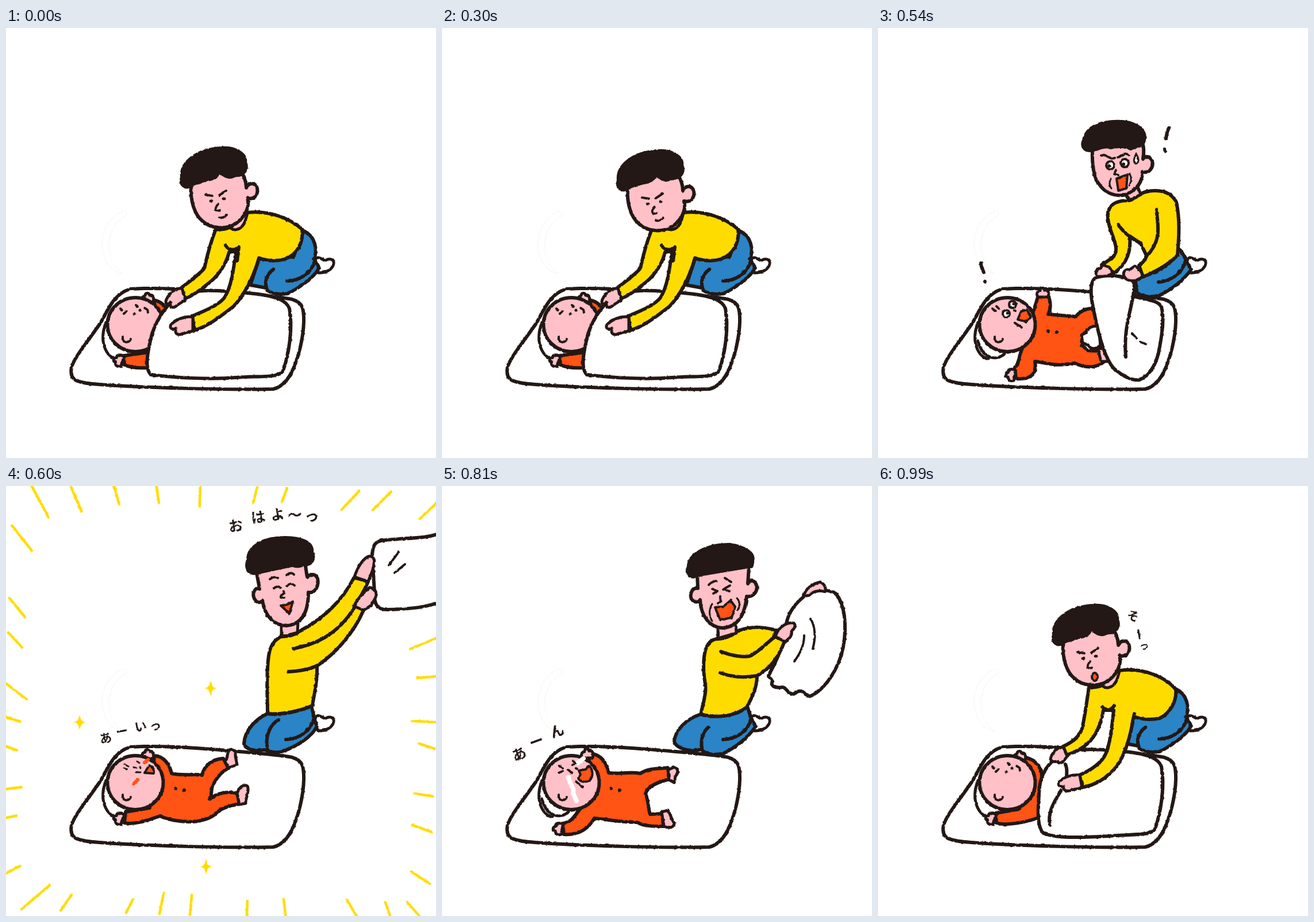
Recreate the animation shown at these times as an HTML page. Size 748 by 748 pixels, loop 1020 ms.

```html
<!DOCTYPE html>
<html lang="ja">
<head>
<meta charset="utf-8">
<title>Morning blanket</title>
<style>
html, body { margin: 0; width: 100%; height: 100%; overflow: hidden; background: #fff; }
svg { display: block; width: 100vw; height: 100vh; }
path, circle, ellipse { stroke: #231815; stroke-width: 6; stroke-linecap: round; stroke-linejoin: round; fill: none; }
.thin { stroke-width: 4; }
.fine { stroke-width: 3; }
.dot { fill: #231815; stroke: none; }
.white { fill: #fff; }
.skin { fill: #ffc0c8; }
.yellow { fill: #ffdc00; }
.blue { fill: #2a84c6; }
.orange { fill: #ff5414; }
.hair { fill: #231815; stroke-width: 4; }
.hand { stroke-width: 5; }
.ray { stroke: #ffdc00; stroke-width: 4.5; }
.star { stroke: none; fill: #ffdc00; }
.blush { stroke: #ff5414; stroke-width: 6; }
.tear { stroke: #fff; stroke-width: 8; }
.ghost { stroke: #f1f1f1; stroke-width: 1; stroke-dasharray: 3 2; }
text { font: 700 25px "Noto Sans CJK JP", "Noto Sans CJK", sans-serif; fill: #231815; text-anchor: middle; }
.small { font-size: 21px; }

.scene { visibility: hidden; animation: 1020ms step-end infinite; }
#cover { animation-name: cover; }
#sneak { animation-name: sneak; }
#shock { animation-name: shock; }
#happy { animation-name: happy; }
#cry { animation-name: cry; }
@keyframes cover { 0% { visibility: visible } 41.17%, 100% { visibility: hidden } }
@keyframes sneak { 0%, 50%, 100% { visibility: hidden } 41.17%, 97.05% { visibility: visible } }
@keyframes shock { 0%, 58.82%, 97.05%, 100% { visibility: hidden } 50%, 88.23% { visibility: visible } }
@keyframes happy { 0%, 73.52%, 100% { visibility: hidden } 58.82% { visibility: visible } }
@keyframes cry { 0%, 88.23%, 100% { visibility: hidden } 73.52% { visibility: visible } }

.nod { animation: nod 1020ms step-end infinite; }
@keyframes nod {
  0%, 11.76%, 23.52%, 35.29% { transform: none }
  5.88%, 17.64%, 29.41%, 41.17% { transform: translate(1px, 5px) }
}
.pop { transform-box: fill-box; transform-origin: 50% 100%; animation: pop 1020ms step-end infinite; }
@keyframes pop {
  0%, 50%, 91.17% { transform: none }
  55.88%, 88.23%, 94.11% { transform: scale(1.25) }
}
.shake { animation: shake 60ms step-end infinite; }
@keyframes shake { 0% { transform: translate(0, 3px) } 49.9% { transform: none } }
.flare { transform-origin: 374px 374px; animation: flare 60ms step-end infinite; }
@keyframes flare { 0% { transform: rotate(2deg) } 49.9% { transform: none } }
.twinkle { transform-box: fill-box; transform-origin: center; animation: twinkle 60ms step-end infinite; }
@keyframes twinkle { 0% { transform: scale(.8) } 49.9% { transform: none } }
</style>
</head>
<body>
<svg viewBox="0 0 748 748">
<defs>
  <filter id="crayon" filterUnits="userSpaceOnUse" x="0" y="0" width="748" height="748" color-interpolation-filters="sRGB">
    <feTurbulence type="fractalNoise" baseFrequency=".2" numOctaves="1" seed="4"/>
    <feDisplacementMap in="SourceGraphic" scale="3" xChannelSelector="R" yChannelSelector="G"/>
  </filter>
  <path id="fist" class="skin hand" d="M-9 7C-12 1-10-3-5-4C-5-10 1-10 3-5C9-7 11 0 9 7Z"/>
  <g id="babyHead">
    <ellipse class="skin" cx="225" cy="516" rx="48.5" ry="47"/>
    <path class="thin" d="M203 537C202 549 214 549 217 541"/>
  </g>
  <g id="sleepFace">
    <path class="thin" d="M199 488L202 491M205 497L209 493M226 482L229 485M241 487L246 490L247 495"/>
    <circle class="dot" cx="223" cy="497" r="2.5"/><circle class="dot" cx="233" cy="491" r="2.5"/>
  </g>
  <g id="sideHead">
    <path class="skin" d="M322 274C320 300 328 325 342 336C358 351 385 350 400 340C414 330 425 312 420 296C435 300 440 285 436 276C430 266 420 272 418 278C418 265 412 255 412 255L380 240L325 265Z"/>
    <path class="hair" d="M324 274C310 283 301 272 305 260C302 235 330 210 375 208C400 206 420 220 417 233C423 248 412 258 400 257C390 263 382 260 372 252C365 262 355 265 346 265C338 272 330 268 324 274Z"/>
    <path class="thin" d="M347 290L359 292M371 291L383 283M369 306C362 315 364 320 372 317"/>
    <ellipse class="dot" cx="357" cy="301" rx="3.5" ry="2.5"/><ellipse class="dot" cx="379" cy="297" rx="3.5" ry="2.5"/>
  </g>
  <g id="crouch">
    <path class="blue" d="M518 353C538 362 542 385 536 402L545 417C535 435 510 452 490 462C470 465 455 460 452 452L425 447L440 402L500 398Z"/>
    <path d="M465 420C451 430 449 445 455 456M489 440C512 440 532 425 537 405"/>
  </g>
  <path id="neck" class="skin hand" d="M386 335L392 349C400 354 411 349 416 336L420 322Z"/>
  <path id="pillowEnd" class="hand" d="M174 545C182 575 205 580 220 567"/>
  <path id="lap" d="M474 407C458 415 449 440 456 460M487 441C512 440 530 425 536 404"/>
  <path id="spark" class="star" d="M0-17C3-4 4-3 13 0C4 3 3 4 0 17C-3 4-4 3-13 0C-4-3-3-4 0-17Z"/>
</defs>

<g filter="url(#crayon)">
  <path class="ghost" d="M203 319C175 330 166 360 167 380C170 405 182 425 203 427C187 417 178 395 179 375C181 350 193 334 208 327C212 321 207 317 203 319Z"/>
  <path class="white" d="M216 454C190 462 180 484 165 512C145 542 119 572 114 590C110 611 120 616 150 619C230 626 400 630 465 628C490 622 503 592 512 555C520 520 519 495 515 485C508 470 490 470 450 466C380 459 290 452 240 453Z"/>
  <path class="hand" d="M174 512C161 545 174 572 192 576"/>
  <path class="white hand" d="M535 408L541 400C547 397 550 405 556 404C563 400 571 402 570 410C568 420 557 426 543 426Z"/>

  <g id="cover" class="scene">
    <path class="orange" d="M256 473C269 475 280 484 281 496L268 508Z"/>
    <path class="orange" d="M205 570L248 564L246 591C230 592 215 590 206 586Z"/>
    <use href="#fist" x="247" y="470"/>
    <use href="#fist" transform="translate(196 578) rotate(-70)"/>
    <use href="#babyHead"/><use href="#sleepFace"/>
    <path class="white" d="M252 603C240 592 247 560 254 532C262 508 277 484 300 466C330 453 370 456 430 462C470 466 488 474 493 488C499 520 493 565 482 596C475 609 445 605 400 608C350 612 290 608 252 603Z"/>
    <use href="#crouch"/>
    <path class="yellow" d="M365 350C380 352 395 350 420 321C460 317 495 332 515 350C518 375 505 395 485 402C465 408 450 403 440 400C432 430 415 465 395 485C375 500 355 517 328 526L324 501C350 490 370 482 380 469C392 450 396 420 400 388L388 390C382 415 365 435 350 446C338 456 325 465 312 471L305 452C320 440 335 430 345 418C350 395 357 370 365 350Z"/>
    <path d="M382 378C388 387 396 388 405 381L402 405"/>
    <path class="skin hand" d="M306 453C295 452 285 460 279 472C276 480 282 483 286 477C285 488 292 488 298 482L312 473Z"/>
    <path class="skin hand" d="M325 503C310 500 295 508 287 516C283 522 290 526 296 522C292 532 300 535 306 532L325 527Z"/>
    <use href="#neck"/>
    <g class="nod">
      <use href="#sideHead"/>
      <path class="thin" d="M371 330C376 331 380 329 384 325"/>
    </g>
  </g>

  <g id="sneak" class="scene">
    <path class="orange" d="M256 472C275 476 289 492 284 515C275 540 285 560 279 577C260 584 225 592 206 586L205 569L246 562Z"/>
    <use href="#fist" x="247" y="470"/>
    <use href="#fist" transform="translate(196 578) rotate(-70)"/>
    <use href="#babyHead"/><use href="#sleepFace"/>
    <path class="white" d="M288 604C275 592 279 560 280 535C281 507 290 487 314 470C340 455 380 457 430 462C470 466 488 474 493 488C499 520 493 565 482 596C475 609 445 605 400 609C350 612 310 613 288 604Z"/>
    <path d="M326 484C330 492 328 500 328 508M299 590C294 565 310 545 318 530"/>
    <use href="#crouch"/>
    <path class="yellow" d="M367 350C382 352 397 348 420 321C460 315 500 332 518 354C520 375 508 395 490 404C470 408 455 405 445 401C440 430 432 465 415 488C400 506 380 520 356 524L350 503C372 494 390 480 396 466C405 445 407 415 410 390L392 390C388 415 378 438 362 450C350 460 340 464 328 468L322 453C338 446 350 436 355 422C360 400 363 375 367 350Z"/>
    <path d="M390 384C397 392 405 391 411 382M446 396L442 415"/>
    <path class="skin hand" d="M322 454C312 454 303 463 300 475C303 482 309 479 312 479C316 485 322 481 329 470Z"/>
    <path class="skin hand" d="M351 503C337 501 322 507 315 515C312 522 318 524 323 522C320 530 330 532 336 529L355 525Z"/>
    <use href="#neck"/>
    <use href="#sideHead" y="-1"/>
    <ellipse class="orange thin" cx="377" cy="332" rx="5" ry="7"/>
    <text class="small" x="444" y="234" transform="rotate(12 444 226)">そ</text>
    <text class="small" transform="translate(454 258) rotate(80)" y="8">ー</text>
    <text x="463" y="284" font-size="16" style="font-size:17px">っ</text>
  </g>

  <g id="shock" class="scene">
    <path class="orange" d="M278 468L296 465C302 480 300 490 296 498L344 502C355 488 372 486 379 490L384 518C362 522 352 532 355 552L365 561L386 562L394 580C380 592 362 592 342 583C310 590 290 582 273 580C277 602 266 612 240 610L238 590C246 585 244 572 250 560Z"/>
    <path class="white hand" d="M384 519C373 517 364 522 362 530L354 534L356 548L366 552C370 560 380 558 387 554Z"/>
    <path class="skin hand" d="M383 560L396 555L400 580L388 580Z"/>
    <circle class="dot" cx="296" cy="527" r="3"/><circle class="dot" cx="311" cy="529" r="3"/>
    <use href="#fist" x="287" y="461"/>
    <use href="#fist" transform="translate(231 603) rotate(-80)"/>
    <use href="#pillowEnd"/>
    <use href="#babyHead"/>
    <circle class="white thin" cx="223" cy="497" r="6"/><circle class="white thin" cx="234" cy="481" r="6"/>
    <circle class="dot" cx="225" cy="496" r="2.5"/><circle class="dot" cx="236" cy="480" r="2.5"/>
    <path class="thin" d="M199 488L204 492M206 484L210 488M237 491L239 492M238 513L250 521"/>
    <path class="orange thin" d="M249 493L259 490L266 502L258 511L243 507Z"/>
    <path class="blue" d="M521 383C531 388 535 405 545 420C530 440 510 455 490 465C470 470 455 466 450 459L448 440L462 432C485 425 505 412 521 395Z"/>
    <path d="M488 442C512 440 530 425 535 405"/>
    <path class="white" d="M380 434C366 440 370 470 377 500C385 540 395 575 410 592C425 605 440 614 455 612C470 605 482 590 488 565C495 530 498 505 493 485C487 474 470 473 446 467L446 442C430 430 400 428 380 434Z"/>
    <path d="M446 440C447 480 426 510 431 572"/><path class="thin" d="M442 531L450 540M456 546L466 550"/>
    <path class="yellow" d="M437 300C450 296 455 286 470 284C495 280 512 288 519 303C525 330 524 360 521 395C505 412 480 425 461 433L454 413C462 407 467 402 467 396L457 375L438 362C440 385 436 408 410 427L389 412C405 402 414 397 414 385C415 370 397 345 400 320C405 303 420 300 437 300Z"/>
    <path d="M418 342C425 353 440 367 457 374M484 316C488 345 493 372 466 398"/>
    <path class="skin hand" d="M409 426C400 432 390 433 381 432C377 425 380 418 387 418L391 412L402 416Z"/>
    <path class="skin hand" d="M428 432C425 423 432 419 437 421L447 414C453 418 460 425 460 432C452 440 440 442 432 437Z"/>
    <path class="skin hand" d="M430 290L438 299L457 290L452 276Z"/>
    <path class="skin" d="M373 212C372 235 375 262 385 272C395 288 415 294 430 290C450 282 460 268 460 250C472 254 480 242 477 231C472 222 464 222 461 228C463 215 462 205 460 200L380 200Z"/>
    <path class="hair" d="M372 214C358 215 352 206 357 195C362 170 390 160 425 162C455 165 468 180 464 195C462 208 450 205 440 211C425 205 415 207 405 209C395 205 385 210 372 214Z"/>
    <path class="thin" d="M389 222C396 217 402 230 412 226M417 225C424 225 428 214 436 221M414 247L411 254L418 256"/>
    <path class="fine" d="M405 262C401 270 403 275 406 279M438 254C442 262 440 268 437 274"/>
    <circle class="white thin" cx="404" cy="239" r="7"/><circle class="white thin" cx="429" cy="235" r="7"/>
    <circle class="dot" cx="402" cy="240" r="3"/><circle class="dot" cx="427" cy="237" r="3"/>
    <path class="orange thin" d="M415 262L434 255L432 279L418 283Z"/>
    <path class="white fine" d="M449 219C455 228 454 236 448 236C443 233 446 225 449 219Z"/>
    <g class="pop"><path d="M506 174C502 181 502 187 501 193M499 211L500 215"/></g>
    <g class="pop"><path d="M179 409C179 415 182 420 184 425M186 441L186.500 441.500"/></g>
  </g>

  <g id="happy" class="scene">
    <g class="flare">
      <path class="ray" d="M25 0L63 65M95 0L120 53M173 0L185 38M248 0L254 33M325 0V38M424 0L418 27M476 0L468 24M602 0L572 34M657 0L626 33M748 5L709 45"/>
      <path class="ray" d="M0 82L36 124M0 208L28 240M0 268L25 293M0 357L36 383M0 415L26 422M0 465L22 472M0 541L32 536M0 592L25 586M0 692L35 673"/>
      <path class="ray" d="M748 250L700 272M748 318L714 322M748 398L707 397M748 444L721 436M748 527L716 523M748 589L714 578M748 679L715 659"/>
      <path class="ray" d="M40 748L87 705M108 748L126 720M222 748L233 724M280 748L286 711M333 748L335 713M432 748V720M500 748L495 715M628 748L605 712M685 748L672 714M744 748L710 713"/>
    </g>
    <g class="twinkle"><use href="#spark" x="356" y="352"/></g>
    <g class="twinkle"><use href="#spark" x="128" y="411"/></g>
    <g class="twinkle"><use href="#spark" x="348" y="662"/></g>
    <path class="orange" d="M258 469C275 470 285 485 288 500C310 505 330 500 341 503C345 485 360 475 378 474L387 491C375 496 365 510 360 520C355 530 360 535 354 545C370 532 385 532 402 534L406 553C390 556 375 560 368 567C360 577 345 582 325 584C300 584 280 580 268 574C250 580 225 590 206 586L208 567L250 560Z"/>
    <path class="skin hand" d="M380 478C387 476 383 465 389 459C395 456 400 462 399 470L402 485L387 490Z"/>
    <path class="skin hand" d="M402 535C405 525 412 518 420 522C424 530 416 545 417 552L406 554Z"/>
    <circle class="dot" cx="295" cy="526" r="3"/><circle class="dot" cx="310" cy="529" r="3"/>
    <use href="#fist" x="247" y="467"/>
    <use href="#fist" transform="translate(196 578) rotate(-70)"/>
    <use href="#babyHead"/>
    <path class="blush" d="M241 481L247 476M222 518L229 511"/>
    <path class="fine" d="M206 484L213 488M205 491L210 493M228 479L232 482M222 489L227 491M233 489L234 490M226 498L234 498"/>
    <path class="orange thin" d="M241 499L249 486C255 487 258 494 257 500Z"/>
    <path class="white" d="M760 80C735 92 700 90 660 94C640 95 638 105 637 120L641 185C640 205 645 216 665 215C700 214 730 212 760 200"/>
    <path class="thin" d="M683 115L666 138M694 136L676 151"/>
    <path class="blue" d="M455 396C475 400 510 392 531 383C536 400 538 412 541 418C530 440 500 455 480 462C470 465 455 462 450 459C430 462 415 457 414 448C415 425 435 405 455 396Z"/>
    <use href="#lap"/>
    <path class="yellow" d="M478 262C495 262 508 256 515 250C550 232 585 200 605 160C612 160 625 165 630 166C625 180 615 195 608 207L622 216C605 255 575 290 541 313C542 345 535 365 533 382C510 392 480 398 455 396C455 370 452 330 457 295C460 275 468 268 478 262Z"/>
    <path d="M500 283C535 276 575 262 607 210M491 323C515 322 530 318 542 312"/>
    <path class="skin hand" d="M606 158C612 140 622 125 632 122C640 122 642 130 640 135C640 145 634 155 630 166Z"/>
    <path class="skin hand" d="M605 209C612 195 622 185 632 177C638 175 639 182 642 182C648 190 640 198 635 208L622 216Z"/>
    <path class="skin hand" d="M479 238L479 262L507 255L508 236Z"/>
    <g class="shake">
      <path class="skin" d="M436 148C438 160 440 168 441 176C432 172 428 185 432 193C436 202 444 200 446 196C450 225 468 240 488 240C512 238 526 220 526 182C538 184 545 170 542 158C538 148 528 150 524 156L520 130Z"/>
      <path class="hair" d="M436 149C420 153 415 140 420 125C420 100 450 86 485 86C515 86 535 95 533 112C540 125 530 137 518 134C505 143 492 131 485 135C470 142 460 138 450 144Z"/>
      <path class="thin" d="M459 159C466 154 470 155 473 157M488 152C494 147 498 148 501 151M466 175C470 171 474 171 477 174M489 171C493 166 497 166 502 170M483 180C486 188 476 184 478 191L484 191"/>
      <path class="orange thin" d="M478 205C487 205 493 202 499 198L493 219Z"/>
    </g>
    <text x="401 440 474 503 533" y="80 65 60 61 63" rotate="-8">おはよ〜っ</text>
    <text class="small" x="175 203 236 261" y="448 436 428 426" rotate="-10">あーいっ</text>
  </g>

  <g id="cry" class="scene">
    <path class="orange" d="M258 465C278 468 285 480 290 499C310 502 325 496 345 500C360 490 380 492 393 490L396 510C375 515 358 522 354 535C360 550 358 560 362 571L383 570L385 592C370 592 350 592 340 585C310 585 285 580 265 578C255 595 240 608 212 606L210 587C225 585 230 575 240 562Z"/>
    <path class="skin hand" d="M393 494L404 489C412 492 411 500 406 505L404 516L395 511Z"/>
    <path class="skin hand" d="M382 567L393 564C398 572 399 580 404 586C404 594 396 596 386 592Z"/>
    <circle class="dot" cx="294" cy="526" r="3"/><circle class="dot" cx="309" cy="529" r="3"/>
    <use href="#fist" x="253" y="466"/>
    <use href="#fist" transform="translate(202 596) rotate(-80)"/>
    <use href="#pillowEnd"/>
    <use href="#babyHead"/>
    <g class="shake">
      <path class="tear" d="M220 506C222 520 231 524 228 534L234 548M236 482L246 474"/>
      <path class="thin" d="M204 487L209 491M203 499L210 496M228 478L232 483L227 485M220 494L226 499M233 491L235 492M233 514L245 524"/>
      <path class="orange thin" d="M238 495L250 493L255 487C263 492 264 506 256 513C248 516 240 515 237 508L241 502Z"/>
    </g>
    <path class="blue" d="M450 397C475 404 510 400 531 383C536 400 540 410 546 418C530 440 510 455 490 465C470 470 455 465 452 458C430 464 408 456 404 445C405 425 425 405 450 397Z"/>
    <path d="M463 420C451 430 449 448 454 462M489 441C512 440 532 427 537 406"/>
    <path class="white" d="M630 192C645 180 670 178 685 187C700 205 705 240 698 280C690 320 665 355 640 366L632 362C627 355 620 355 612 362C600 362 600 350 592 350C580 352 570 348 575 340L568 330C575 315 585 300 588 285L600 235C605 215 620 200 630 192Z"/>
    <path class="thin" d="M641 231C650 245 650 265 645 283M630 260C630 280 620 295 613 305"/>
    <path class="skin hand" d="M629 192C632 178 645 170 658 167C668 172 668 180 666 184C655 180 643 185 639 190Z"/>
    <path class="yellow" d="M480 266C495 266 505 258 515 252C540 243 560 245 582 251L577 262C580 262 590 266 596 270C585 300 570 318 548 330C548 355 535 375 530 385C510 400 480 405 450 397C455 375 460 360 458 345C452 310 456 285 463 275C468 268 474 266 480 266Z"/>
    <path d="M485 288C505 296 525 298 535 296C550 290 565 272 580 262M484 325C505 333 525 334 548 330"/>
    <path class="skin hand" d="M580 262C583 250 595 238 608 238C618 238 614 248 608 252C610 262 602 266 597 271Z"/>
    <path class="skin hand" d="M480 243L480 265L512 256L511 238Z"/>
    <g class="shake">
      <path class="skin" d="M444 155L445 178C436 176 430 187 434 197C440 204 447 202 449 198C450 225 465 246 488 247C515 245 527 225 530 192C542 194 550 182 547 172C543 162 534 164 532 170L534 140Z"/>
      <path class="hair" d="M444 157C430 163 422 152 428 140C428 118 460 101 500 101C530 105 545 118 541 130C542 142 535 145 525 138C515 146 505 142 500 146C490 150 480 145 475 148C465 152 455 150 444 157Z"/>
      <path class="thin" d="M464 172C468 167 473 166 477 165M492 160L503 167M470 179L479 183L472 187M501 173L489 180L500 183M484 192C482 198 490 199 480 204"/>
      <path class="fine" d="M470 205C464 215 464 225 470 235M513 195C520 203 518 210 514 216"/>
      <path class="orange thin" d="M475 211L489 210L502 199L510 210L504 229L484 233Z"/>
    </g>
    <text x="138 168 204" y="479 457 439" rotate="-20">あーん</text>
  </g>
</g>
</svg>
</body>
</html>
```
